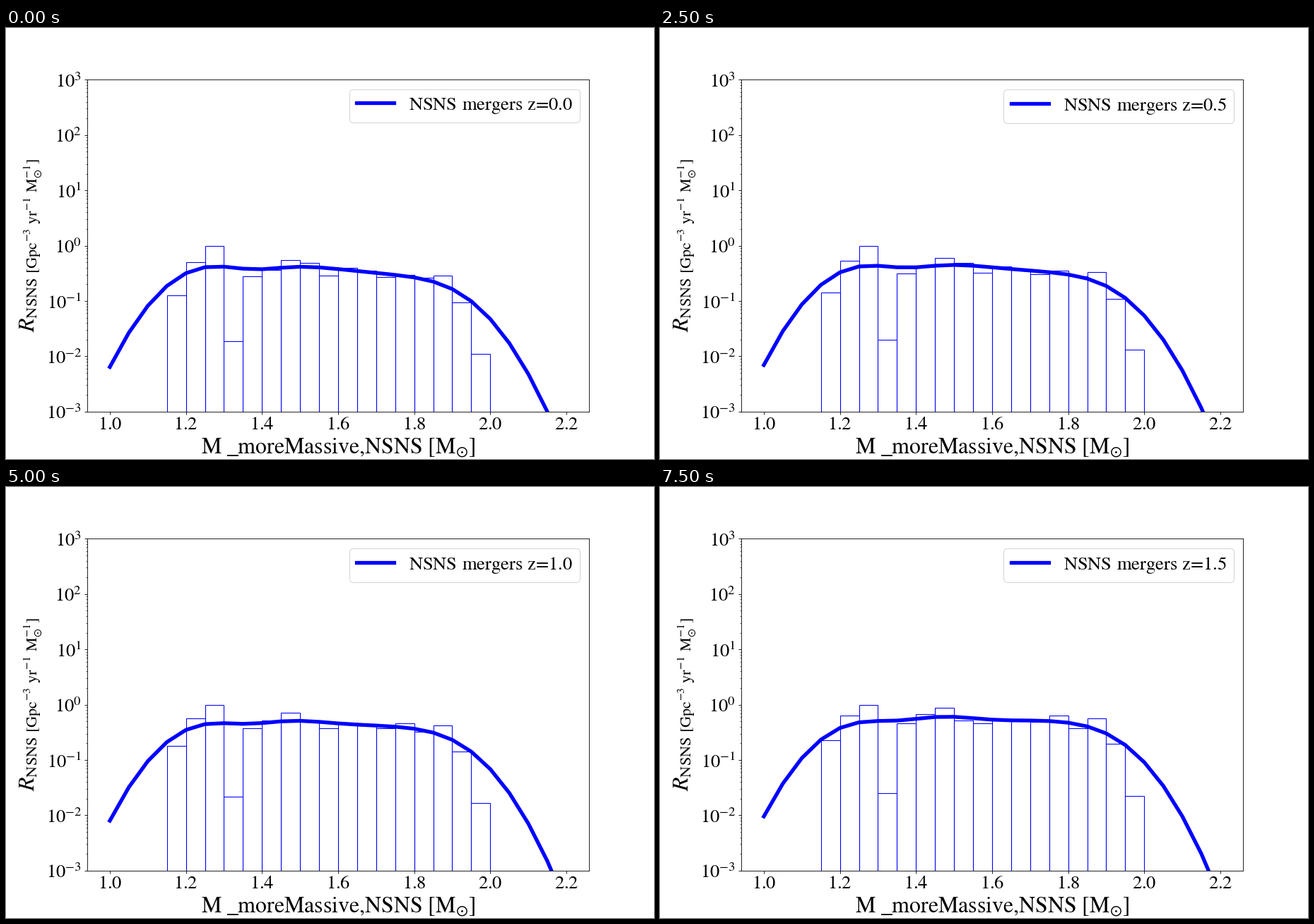
A matplotlib script for the animation above (8 s loop, 917x611 px).

```python
import matplotlib.pyplot as plt
import numpy as np
from matplotlib.animation import FuncAnimation
from matplotlib.ticker import LogLocator, MultipleLocator, NullFormatter

W, H, DPI = 917, 611, 76.4
FRAMES, INTERVAL = 16, 500
Z_MAX = 1.5
BIN, SIGMA = 0.05, 0.081
GAP = r"\hspace{0.38}"

plt.rcParams.update({
    "font.family": "Liberation Serif",
    "mathtext.fontset": "stix",
    "axes.labelsize": 30,
    "xtick.labelsize": 25,
    "ytick.labelsize": 25,
    "legend.fontsize": 25,
})

# Merger rate per mass bin at the first and the last redshift
FIRST = np.array([.127, .5, 1, .0186, .28, .36, .55, .49, .29,
                  .4, .35, .27, .3, .263, .288, .093, .0112])
LAST = np.array([.229, .63, 1, .025, .457, .68, .87, .51, .457,
                 .54, .51, .49, .63, .37, .56, .195, .0224])

edges = 1.15 + BIN * np.arange(len(FIRST))
masses = 1 + BIN * np.arange(25)
offsets = (masses[:, None] - edges - BIN / 2) / SIGMA
kernel = np.exp(-offsets ** 2 / 2) * BIN / (SIGMA * np.sqrt(2 * np.pi))


def rates(z):
    """Grow each bin geometrically, slowly at first."""
    return FIRST * (LAST / FIRST) ** ((z / Z_MAX) ** 1.4)


def legend_text(z):
    # The negative spaces cancel the padding around the relation sign
    words = GAP.join(["NSNS", "mergers", r"z\hspace{-0.2}=\hspace{-0.2}"])
    return rf"$\mathrm{{{words}{z:.1f}}}$"


# The tiny surplus guards against truncation to one pixel less
fig = plt.figure(figsize=((W + 1e-6) / DPI, (H + 1e-6) / DPI), dpi=DPI)
ax = fig.add_axes([0.125, 0.11, 0.775, 0.77])
ax.set_yscale("log")
ax.set_xlim(0.94, 2.26)
ax.set_ylim(1e-3, 1e3)

ax.xaxis.set_major_locator(MultipleLocator(0.2))
ax.xaxis.set_major_formatter(lambda x, _: r"$\mathrm{%.1f}$" % x)
ax.yaxis.set_major_locator(LogLocator(numticks=10))
ax.yaxis.set_minor_locator(LogLocator(subs=range(2, 10), numticks=10))
ax.yaxis.set_major_formatter(
    lambda y, _: r"$\mathrm{10^{%d}}$" % round(np.log10(y)))
ax.yaxis.set_minor_formatter(NullFormatter())
ax.tick_params(axis="x", pad=4.7)

ax.set_xlabel(r"$\mathrm{M\ \_moreMassive{,}NSNS\ [M_{\odot}]}$",
              labelpad=4.7)
units = GAP.join(["NSNS", "[Gpc^{-3}", "yr^{-1}", r"M_{\odot}^{-1}]"])
ax.set_ylabel(rf"$R_{{\mathrm{{{units}}}}}$", labelpad=2.8)

bars = ax.bar(edges, rates(0), BIN, bottom=1e-6, align="edge",
              fill=False, edgecolor="blue", linewidth=1)
line, = ax.plot(masses, kernel @ rates(0), color="blue", lw=5,
                label=legend_text(0))
label = ax.legend(loc="upper right", borderpad=0.38).get_texts()[0]


def update(i):
    z = i / 10
    now = rates(z)
    for bar, rate in zip(bars, now):
        bar.set_height(rate)
    line.set_ydata(kernel @ now)
    label.set_text(legend_text(z))
    return [*bars, line, label]


anim = FuncAnimation(fig, update, frames=FRAMES, interval=INTERVAL,
                     repeat=True, repeat_delay=0, blit=False)
plt.show()
```
